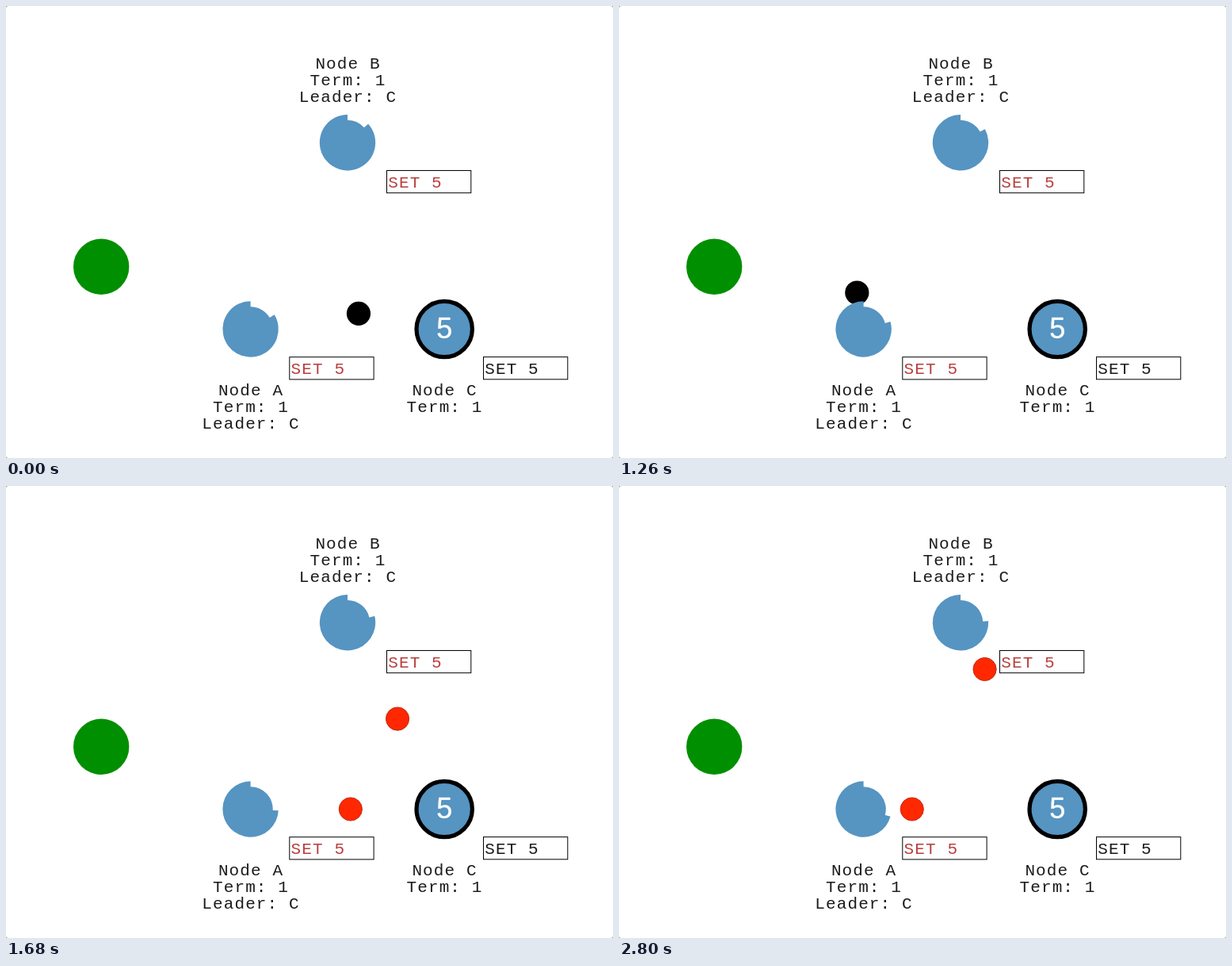
Recreate the animation shown at these times as an HTML page. Size 766 by 570 pixels, loop 3.22 s.

```html
<!DOCTYPE html>
<html lang="en">
<head>
<meta charset="utf-8">
<title>Consensus messages</title>
<style>
  html, body { margin: 0; width: 100%; height: 100%; overflow: hidden; background: #777; }
  svg { display: block; width: 766px; height: 570px; }
  text { font: 21px "Courier New", "Liberation Mono", monospace; letter-spacing: 1.1px; white-space: pre; fill: #1c1c1c; }
  .label { text-anchor: middle; }
  .value { font: 36px "Liberation Sans", Arial, sans-serif; letter-spacing: 0; text-anchor: middle; fill: #fff; stroke: #fff; stroke-width: .4; }
  .node { fill: #5694c2; }
  .box { fill: none; stroke: #000; }
  .pending { fill: #b8403f; }
  .red { fill: #ff2800; stroke: #c42a14; }
</style>
</head>
<body>
<svg id="stage" viewBox="0 0 766 570"></svg>
<script>
const LOOP = 3220, STEP = 70, RIM = 35.2, FACE = 28.2;
const client = { x: 120.2, y: 328.8 };
const A = { x: 308.6, y: 407.5, angle: 58.8, sweep: 46.5 };
const B = { x: 431, y: 172.2, angle: 48, sweep: 39 };
const C = { x: 553.2, y: 407.5 };

// Simulation clock: paused, released, then paused again one unit later.
const clockKeys = [[840, .25], [910, .27], [980, .334], [1260, .584], [1540, .85], [1820, 1.118], [1960, 1.25]];

const stage = document.getElementById("stage");

function add(tag, attrs, text = "") {
  const el = document.createElementNS("http://www.w3.org/2000/svg", tag);
  for (const name in attrs) el.setAttribute(name, attrs[name]);
  el.textContent = text;
  return stage.appendChild(el);
}

function addLabel(x, baseline, lines) {
  lines.forEach((line, i) => add("text", { class: "label", x, y: baseline + i * 21.2 }, line));
}

function addLog(x, y, textClass) {
  add("rect", { class: "box", x, y, width: 106.3, height: 28.2 });
  add("text", { class: textClass, x: x + 1.8, y: y + 21.5 }, "SET 5");
}

function simClock(t) {
  let [t0, v0] = clockKeys[0];
  for (const [t1, v1] of clockKeys) {
    if (t <= t1) return t1 === t0 ? v0 : v0 + (v1 - v0) * Math.max(0, t - t0) / (t1 - t0);
    [t0, v0] = [t1, v1];
  }
  return v0;
}

// Disc whose rim is cut away clockwise from the top.
function timerPath({ x, y }, degrees) {
  const a = degrees * Math.PI / 180;
  const point = r => `${x + r * Math.sin(a)} ${y - r * Math.cos(a)}`;
  return `M${x} ${y - FACE}A${FACE} ${FACE} 0 0 1 ${point(FACE)}L${point(RIM)}A${RIM} ${RIM} 0 1 1 ${x} ${y - RIM}Z`;
}

function placeMessage(ball, from, to, progress) {
  ball.setAttribute("cx", from.x + (to.x - from.x) * progress);
  ball.setAttribute("cy", from.y + (to.y - from.y) * progress);
  ball.setAttribute("visibility", progress > 0 && progress < 1 ? "visible" : "hidden");
}

add("rect", { width: 766, height: 570, rx: 2.5, fill: "#fff" });
const reply = add("circle", { r: 15.1 });
const toA = add("circle", { r: 14.6, class: "red" });
const toB = add("circle", { r: 14.6, class: "red" });

add("circle", { cx: client.x, cy: client.y, r: RIM, fill: "#008f00" });
const timers = [A, B].map(node => ({ node, path: add("path", { class: "node" }) }));
add("circle", { class: "node", cx: C.x, cy: C.y, r: RIM, stroke: "#000", "stroke-width": 5.2 });
add("text", { class: "value", x: C.x, y: 418.8 }, "5");

addLabel(431.5, 78.5, ["Node B", "Term: 1", "Leader: C"]);
addLabel(309, 490.5, ["Node A", "Term: 1", "Leader: C"]);
addLabel(553.5, 490.5, ["Node C", "Term: 1"]);
addLog(480.5, 207.5, "pending");
addLog(357.8, 442.7, "pending");
addLog(602.5, 442.6, "");

function draw(now) {
  const t = Math.floor((now % LOOP + .5) / STEP) * STEP;
  const clock = simClock(t);
  placeMessage(reply, C, client, clock);
  placeMessage(toA, C, A, clock - .5);
  placeMessage(toB, C, B, clock - .5);
  for (const { node, path } of timers) {
    path.setAttribute("d", timerPath(node, node.angle + node.sweep * (clock - .25)));
  }
}

function tick(now) {
  draw(now);
  requestAnimationFrame(tick);
}

draw(0);
requestAnimationFrame(tick);
</script>
</body>
</html>
```
